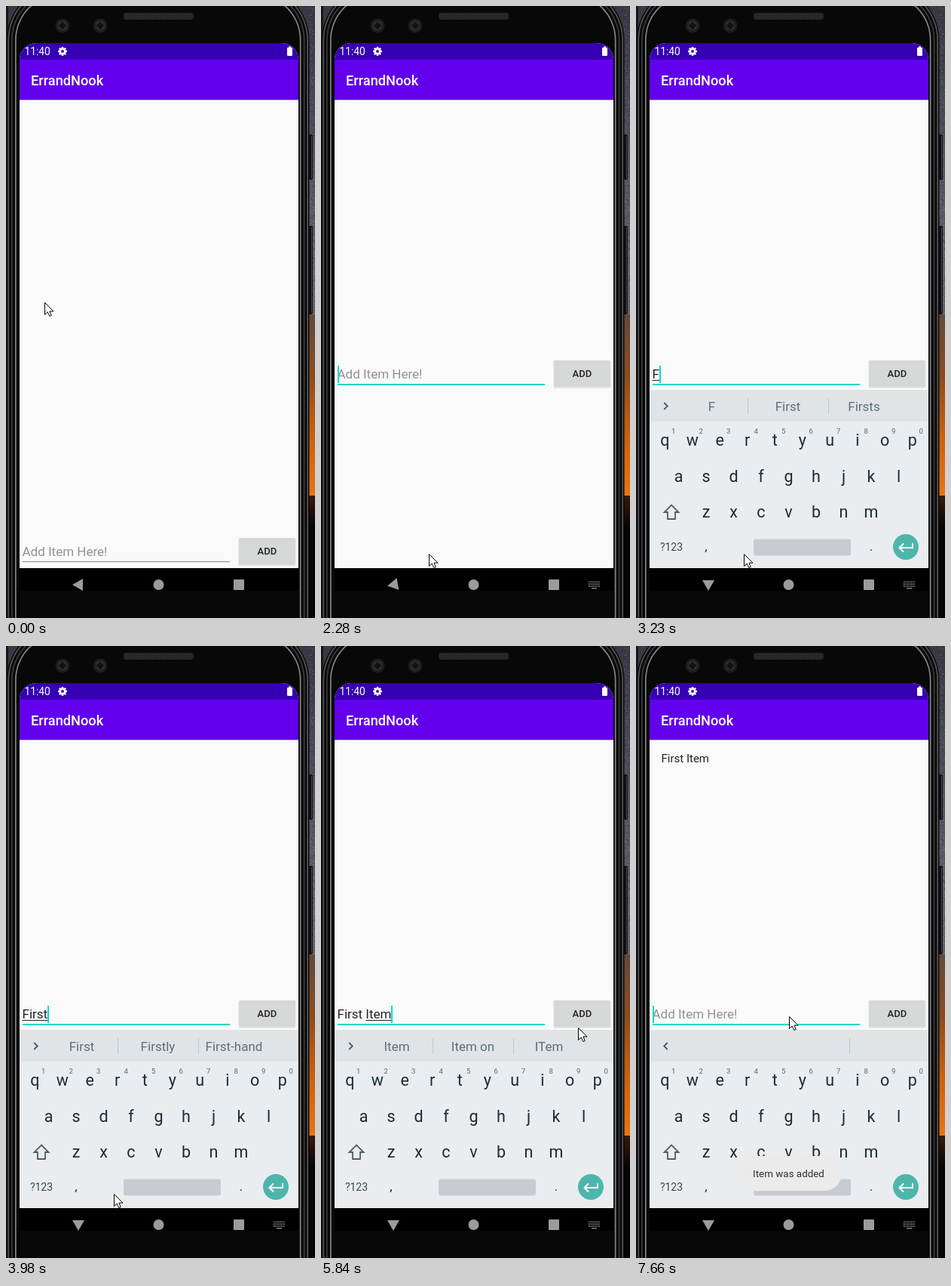
Animation, 410 px wide and 810 px high, one loop 8 s. Source, as an HTML page with a canvas:

```html
<!DOCTYPE html>
<html lang="en">
<head>
<meta charset="utf-8">
<title>To-do app demo</title>
<style>
html, body { margin: 0; width: 100%; height: 100%; overflow: hidden; background: #000; }
canvas { display: block; width: 410px; height: 810px; }
</style>
</head>
<body>
<canvas id="stage" width="410" height="810"></canvas>
<script>
const W = 410, H = 810, LOOP = 8000;
const FOCUS = 1480, RAISE = 2000, TURN = 2280, KEYBOARD = 2560, PRESS = 6390, ADDED = 6630;
const FIRST = { word: 'First', start: 3080, gap: 225 };
const ITEM = { word: 'Item', start: 4410, gap: 170 };
const SPACE = 4130, BLINK = 460, POINTER_STEP = 126;
const TEAL = '#0fd9c6', INK = '#212121', HINT = '#929292', NAV = '#9b9b9b', KEY = '#1b2b34';
const ctx = document.getElementById('stage').getContext('2d');

const completions = {
  First: ['First', 'Firstly', 'First-hand'],
  Item: ['Item', 'Item on', 'ITem']
};
const home = [51, 392];
const moves = [
  { start: 120, steps: 1, to: [363, 409] },
  { start: 580, steps: 6, to: [143, 725], via: [210, 790] },
  { start: 5450, steps: 3, to: [398, 449] },
  { start: 5840, steps: 1, to: [341, 505] },
  { start: 5980, steps: 2, to: [341, 492] },
  { start: 7400, steps: 3, to: [203, 490] }
];

const clamp01 = v => Math.max(0, Math.min(1, v));

// The pointer follows quadratic curves, seen only at coarse steps.
function pointerAt(t) {
  let pos = home;
  for (const { start, steps, to, via } of moves) {
    if (t < start) break;
    const u = Math.min(1, (Math.floor((t - start) / POINTER_STEP) + 1) / steps);
    pos = pos.map((from, i) => {
      const mid = via ? via[i] : (from + to[i]) / 2;
      return Math.round((1 - u) ** 2 * from + 2 * u * (1 - u) * mid + u * u * to[i]);
    });
  }
  return pos;
}

const typed = ({ word, start, gap }, t) =>
  word.slice(0, Math.max(0, Math.floor((t - start) / gap) + 1));

function fieldText(t) {
  if (t >= ADDED) return '';
  return typed(FIRST, t) + (t >= SPACE ? ' ' : '') + typed(ITEM, t);
}

function suggestions(t) {
  const text = fieldText(t);
  if (!text) return null;
  const word = text.split(' ').pop();
  if (!word) return ['of', 'time', 'thing'];
  const full = text.includes(' ') ? 'Item' : 'First';
  return completions[word] || [word, full, full + 's'];
}

// The caret stays lit while editing, then blinks.
function caretOn(t) {
  const edits = [[FOCUS, FOCUS], [RAISE, RAISE], [FIRST.start, SPACE],
    [ITEM.start, ITEM.start + 3 * ITEM.gap], [ADDED, ADDED]];
  const last = edits.filter(([start]) => t >= start).pop();
  return last && Math.floor(Math.max(0, t - last[1]) / BLINK) % 2 === 0;
}

function rect(g, color, x, y, w, h, r = 0) {
  g.fillStyle = color;
  g.beginPath();
  g.roundRect(x, y, w, h, r);
  g.fill();
}

function disc(g, color, x, y, r) {
  g.fillStyle = color;
  g.beginPath();
  g.arc(x, y, r, 0, Math.PI * 2);
  g.fill();
}

function path(g, points, closed) {
  g.beginPath();
  points.forEach(([x, y]) => g.lineTo(x, y));
  if (closed) g.closePath();
}

function line(g, color, width, points, closed) {
  g.strokeStyle = color;
  g.lineWidth = width;
  path(g, points, closed);
  g.stroke();
}

function label(g, text, x, y, size, color, align = 'left', weight = 400) {
  g.font = `${weight} ${size}px Roboto, sans-serif`;
  g.textAlign = align;
  g.fillStyle = color;
  g.fillText(text, x, y);
}

function layer(draw) {
  const canvas = document.createElement('canvas');
  canvas.width = W;
  canvas.height = H;
  draw(canvas.getContext('2d'));
  return canvas;
}

function gradient(g, top, bottom, ...colors) {
  const fill = g.createLinearGradient(0, top, 0, bottom);
  colors.forEach((color, i) => fill.addColorStop(i / (colors.length - 1), color));
  g.fillStyle = fill;
  g.fillRect(0, top, W, bottom - top);
}

function drawSky(g) {
  rect(g, '#050505', 0, 0, W, H);
  gradient(g, 0, 408, '#383744', '#55535f', '#686570');
  gradient(g, 408, 648, '#634a3e', '#8a4c22', '#c9600f', '#ea7510');
  gradient(g, 648, 690, '#3a1a08', '#050505');
  let seed = 7;
  const random = () => (seed = seed * 16807 % 2147483647) / 2147483647;
  for (let i = 0; i < 700; i++) {
    g.fillStyle = random() < 0.5 ? '#aaa8b440' : '#14141c50';
    g.fillRect(402 + Math.floor(random() * 8), Math.floor(random() * 408), 1, 1);
  }
  rect(g, '#17161c', 0, 0, 3, H);
}

function drawBody(g) {
  for (const [y, h] of [[170, 60], [291, 117]]) {
    rect(g, '#111113', 401, y, 6, h, 2);
    rect(g, '#4a4a4e', 405, y + 2, 1, h - 4);
  }
  // Bezel rings share their corner centres.
  const ring = (x, color) => rect(g, color, x, x - 28, 403.5 - 2 * x, 900, 73 - x);
  ring(1, '#0b0b0b');
  for (const [x, color] of [[2.5, '#555557'], [7, '#3c3c3e'], [12, '#858588']]) {
    ring(x, color);
    ring(x + 1.7, '#080808');
  }

  rect(g, '#252525', 156, 9, 93, 9, 3);
  for (let x = 158; x < 248; x += 3) {
    for (let y = 11; y < 18; y += 3) rect(g, '#3b3b3b', x, y, 1, 1);
  }
  for (const x of [75, 125]) {
    disc(g, '#1b1c1e', x, 26, 9.5);
    disc(g, '#25272a', x, 26, 7);
    disc(g, '#111214', x, 26, 4);
    for (let a = 0.7; a < 6; a += Math.PI / 2) {
      disc(g, '#3c3f44', x + 4.5 * Math.cos(a), 26 + 4.5 * Math.sin(a), 1);
    }
  }
}

function drawAppFrame(g) {
  g.save();
  g.beginPath();
  g.roundRect(18, 49, 370, 695, [22, 22, 0, 0]);
  g.clip();
  rect(g, '#fafafa', 18, 49, 370, 695);
  rect(g, '#3700b3', 18, 49, 370, 22);
  rect(g, '#6200ee', 18, 71, 370, 53);
  rect(g, '#c5b3e6', 18, 124, 370, 1);
  g.restore();

  label(g, '11:40', 24.5, 65, 13.8, '#fff');
  label(g, 'ErrandNook', 33, 105, 18.2, '#fff', 'left', 500);
  for (let i = 0; i < 8; i++) {
    const a = i * Math.PI / 4;
    line(g, '#fff', 2.4, [[75, 60], [75 + 6 * Math.cos(a), 60 + 6 * Math.sin(a)]]);
  }
  disc(g, '#fff', 75, 60, 4.7);
  disc(g, '#3700b3', 75, 60, 1.9);
  rect(g, '#fff', 373, 55, 7, 11, 1);
  rect(g, '#fff', 375, 53.5, 3, 2);

  rect(g, '#000', 18, 744, 370, 30);
  disc(g, NAV, 202.5, 766, 7);
  rect(g, NAV, 302, 759, 14, 14, 1);
}

function drawKeys(g) {
  rect(g, '#e9edf0', 18, 508, 370, 236);
  rect(g, '#e0e4e7', 18, 508, 370, 42);
  ['qwertyuiop', 'asdfghjkl', 'zxcvbnm'].forEach((row, r) => {
    const left = 202.5 - (row.length - 1) * 18.25;
    [...row].forEach((key, i) => {
      const x = left + i * 36.5;
      label(g, key, x, 582 + r * 47.5, 21.5, KEY, 'center');
      if (r === 0) label(g, (i + 1) % 10, x + 11.5, 566, 9.5, '#59666d', 'center');
    });
  });
  label(g, '?123', 47, 721, 14, '#37474f', 'center');
  label(g, ',', 93, 721, 17, KEY, 'center');
  label(g, '.', 312, 721, 17, KEY, 'center');
  rect(g, '#c8ccd0', 156, 705.5, 129, 22, 3);
  disc(g, '#4db6ac', 358, 716, 17);
  line(g, '#fff', 2, [[367, 711], [367, 717], [350, 717]]);
  line(g, '#fff', 2, [[355, 711.5], [349.5, 717], [355, 722.5]]);
}

const backdrop = layer(g => { drawSky(g); drawBody(g); drawAppFrame(g); });
const keys = layer(drawKeys);

function drawBackButton(t) {
  const degrees = t < TURN ? 0 : t < KEYBOARD ? -10 : -90;
  ctx.save();
  ctx.translate(96, 766);
  ctx.rotate(degrees * Math.PI / 180);
  ctx.fillStyle = NAV;
  path(ctx, [[-8, 0], [6, -8], [6, 8]], true);
  ctx.fill();
  ctx.restore();
}

function drawKeyboardIcon() {
  for (let row = 0; row < 3; row++) {
    for (let i = 0; i < 6; i++) rect(ctx, '#858585', 355 + i * 2.6, 761.5 + row * 2.8, 1.6, 1.6);
  }
  rect(ctx, '#858585', 359, 770, 7, 1.4);
}

function drawInput(t) {
  const top = t < RAISE ? 704 : 469;
  const text = fieldText(t);
  const base = top + 24;
  rect(ctx, '#00000018', 308.5, top, 76, 37, 2);
  rect(ctx, '#d6d7d7', 309, top, 75, 35, 2);
  if (t >= PRESS) rect(ctx, `rgba(0,0,0,${0.1 * clamp01(1 - (t - PRESS) / 400)})`, 309, top, 75, 35, 2);
  label(ctx, 'ADD', 346.3, top + 22, 13, INK, 'center', 500);
  if (t >= FOCUS) rect(ctx, TEAL, 22, top + 31, 275, 2);
  else rect(ctx, '#8b8b8b', 22, top + 31, 275, 1);

  label(ctx, text || 'Add Item Here!', 21.5, base, 17, text ? INK : HINT);
  const end = 21.5 + (text && ctx.measureText(text).width);
  const word = text.split(' ').pop();
  if (word) {
    const width = ctx.measureText(word).width;
    rect(ctx, INK, end - width, base + 2, width, 1);
  }
  if (caretOn(t)) rect(ctx, TEAL, Math.round(end), top + 7, 2, 23);
}

function drawKeyboard(t) {
  ctx.drawImage(keys, 0, 0);
  const words = suggestions(t);
  const side = words ? 2.25 : -2.25;
  line(ctx, '#4c5a61', 1.8, [[39.5 - side, 525], [39.5 + side, 529.5], [39.5 - side, 534]]);
  for (const x of words ? [148, 255] : [283]) rect(ctx, '#c2c8cc', x, 519, 1, 21);
  (words || []).forEach((word, i) => label(ctx, word, 100.5 + i * 101, 536, 17, '#616d74', 'center'));
  if (t >= FIRST.start) {
    line(ctx, '#505d64', 1.8, [[47, 660.5], [56.5, 670], [52, 670], [52, 679], [42, 679], [42, 670], [37.5, 670]], true);
  }
}

function drawToast(alpha) {
  ctx.globalAlpha = alpha;
  rect(ctx, '#ebebeb', 134, 675, 139, 46, 23);
  label(ctx, 'Item was added', 202.5, 703, 13.4, '#2f2f2f', 'center');
  ctx.globalAlpha = 1;
}

function drawPointer([x, y]) {
  const arrow = [[0, 0], [0, 16], [3.7, 12.5], [6.3, 18], [8.8, 17], [6.4, 11.6], [11.5, 11.6]];
  const points = arrow.map(([dx, dy]) => [x + 0.5 + dx, y + 0.5 + dy]);
  path(ctx, points, true);
  ctx.fillStyle = '#fff';
  ctx.fill();
  line(ctx, '#000', 1, points, true);
}

function draw(t) {
  ctx.drawImage(backdrop, 0, 0);
  drawBackButton(t);
  if (t >= FOCUS + 120) drawKeyboardIcon();
  if (t >= ADDED) label(ctx, 'First Item', 33.5, 153.5, 15, INK);
  drawInput(t);
  if (t >= KEYBOARD) drawKeyboard(t);
  if (t >= ADDED) drawToast(clamp01((t - ADDED) / 350));
  drawPointer(pointerAt(t));
}

const startTime = performance.now();
function tick() {
  draw((performance.now() - startTime) % LOOP);
  requestAnimationFrame(tick);
}
tick();
</script>
</body>
</html>
```
